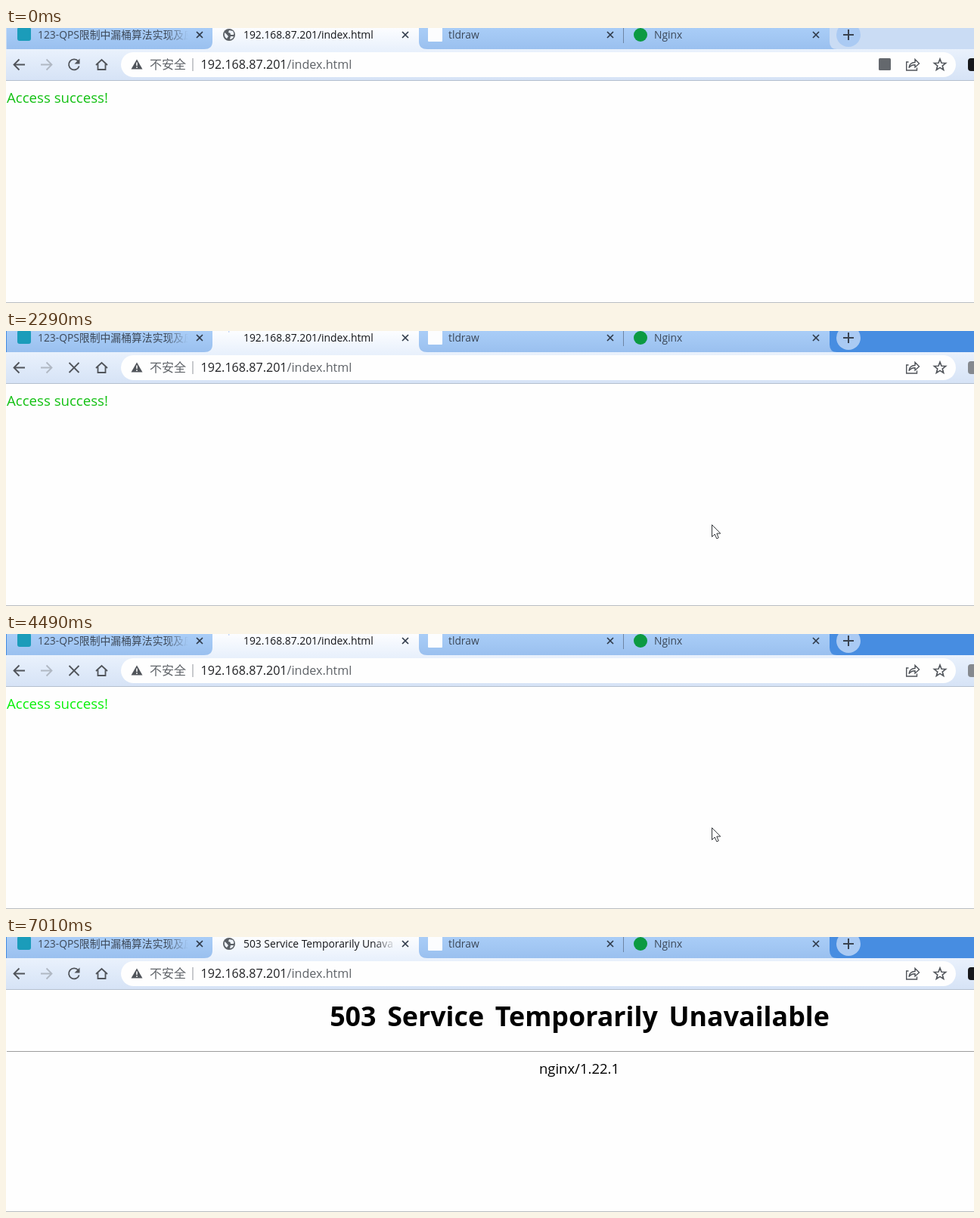
An HTML page for the animation above (8 s loop, 1280 px wide and 364 px high).

```html
<!DOCTYPE html>
<html lang="zh-CN">
<head>
<meta charset="utf-8">
<title>503 demo</title>
<style>
  html, body { margin: 0; width: 100%; height: 100%; overflow: hidden; background: #fefefe; }
  svg { display: block; width: 1280px; height: 364px; }
  text { font-family: "Open Sans", "Noto Sans CJK SC", "Noto Sans CJK", sans-serif; white-space: pre; }
  .tab { font-size: 13.84px; fill: #3c4858; }
  .line { fill: none; stroke: #50545a; stroke-width: 1.8; }
  .thin { stroke-width: 1.4; }
</style>
</head>
<body>
<svg viewBox="0 0 1280 364">
  <defs>
    <linearGradient id="inactive" x2="0" y2="1">
      <stop stop-color="#a9cdf7"/><stop offset="1" stop-color="#9ac0ef"/>
    </linearGradient>
    <linearGradient id="bar" gradientUnits="userSpaceOnUse" x1="0" y1="0" x2="0" y2="69">
      <stop stop-color="#fcfdff"/><stop offset=".42" stop-color="#e9f1fc"/><stop offset="1" stop-color="#d6e3f6"/>
    </linearGradient>
    <linearGradient id="fadeA" gradientUnits="userSpaceOnUse" x1="212" x2="241" y1="0" y2="0">
      <stop stop-color="#3c4858"/><stop offset="1" stop-color="#3c4858" stop-opacity="0"/>
    </linearGradient>
    <linearGradient id="fadeB" gradientUnits="userSpaceOnUse" x1="486" x2="516" y1="0" y2="0">
      <stop stop-color="#141518"/><stop offset="1" stop-color="#141518" stop-opacity="0"/>
    </linearGradient>
    <path id="close" d="M-4-4 4 4M-4 4 4-4" fill="none" stroke="#303b4a" stroke-width="1.7"/>
  </defs>

  <!-- tab strip -->
  <rect id="strip" width="1280" height="28"/>
  <path d="M1 0H1089V18Q1089 28 1099 28H1Z" fill="url(#inactive)"/>
  <path d="M262 28Q273 28 273 18V0H546V18Q546 28 557 28H1280V69H0V28Z" fill="url(#bar)"/>
  <path d="M816.5 0V20" stroke="#6e84a2"/>
  <circle cx="1114" cy="9" r="16" fill="#aacaf3"/>
  <path d="M1107 9H1121M1114 2V16" stroke="#3a4350" stroke-width="2"/>

  <rect x="15" y="-1" width="18" height="18" rx="3" fill="#1b9cba"/>
  <rect x="558" y="-2" width="19" height="20" rx="1" fill="#fcfdfe"/>
  <circle cx="839" cy="9" r="9" fill="#0c9a42"/>

  <text class="tab" x="42" y="14" style="fill:url(#fadeA)">123-QPS限制中漏桶算法实现及应</text>
  <text class="tab" id="title" x="314" y="14"></text>
  <text class="tab" x="585" y="14">tldraw</text>
  <text class="tab" x="857" y="14">Nginx</text>
  <use href="#close" x="256" y="9"/><use href="#close" x="528" y="9"/>
  <use href="#close" x="799" y="9"/><use href="#close" x="1071" y="9"/>

  <g id="globe">
    <circle cx="295" cy="9" r="8" fill="#5b6066"/>
    <path d="M289 6Q292 8 294 11L292 14Q288 12 289 6M295 3L300 4Q302 7 301 9L297 9Q297 6 294 6ZM297 11L301 11Q300 15 296 15Z" fill="#eef3fa"/>
  </g>
  <path id="spinner" fill="none" stroke="#a9c6f4" stroke-width="2"/>

  <!-- toolbar -->
  <rect x="152" y="32" width="1104" height="33" rx="16.5" fill="#fefefe"/>
  <path d="M0 69.5H1280" stroke="#b4bfce"/>
  <path class="line" d="M25 48.5H11M17.5 41.5L10.5 48.5L17.5 55.5"/>
  <path class="line" d="M46 48.5H60M53.5 41.5L60.5 48.5L53.5 55.5" style="stroke:#b0b8c3"/>
  <g id="reload">
    <path class="line" d="M95.5 44A7 7 0 1 0 96.7 50.5"/>
    <path d="M97.5 40.5V47.5H90.5Z" fill="#50545a"/>
  </g>
  <path id="stop" class="line" d="M83.5 42L96.5 55M83.5 55L96.5 42"/>
  <path class="line" d="M119 49L126.5 42L134 49M121.5 47.5V55H131.5V47.5"/>
  <path d="M173 41.5L180.5 54.5H165.5Z" fill="#50545a"/>
  <path d="M173 45.5V50M173 51.3V53" stroke="#fff" stroke-width="1.5"/>
  <text x="190" y="54" font-size="16" fill="#5f6368">不安全</text>
  <path d="M247 40V57" stroke="#a3a7ac" stroke-width="1.2"/>
  <text x="257.5" y="54" font-size="16.1" fill="#5f6368"><tspan fill="#202124">192.168.87.201</tspan>/index.html</text>
  <rect id="translate" x="1154" y="40" width="16" height="16" rx="1.5" fill="#64686d"/>
  <path class="line thin" d="M1193.5 45H1190.7V56H1204.5V52.5M1194 52.5Q1195 45.5 1202 45.5V41.5L1207.5 47L1202 52V48.7Q1197 48.5 1194 52.5Z"/>
  <path class="line" id="star" style="stroke-width:1.6"/>
  <rect id="extension" x="1272" y="40" width="18" height="17" rx="4"/>

  <!-- page -->
  <text id="okPage" x="1" y="99" font-size="18.65">Access success!</text>
  <g id="errorPage" text-anchor="middle">
    <text x="758.5" y="118" font-size="35.8" font-weight="700" word-spacing="5.4">503 Service Temporarily Unavailable</text>
    <path d="M1 151.5H1280" stroke="#9c9c9c"/>
    <text x="758" y="181" font-size="18.5">nginx/1.22.1</text>
  </g>
  <path d="M0 363.5H1280" stroke="#b9bcc0" stroke-width="1.2"/>

  <g id="cursor">
    <circle id="click" cx="3" cy="1" r="14" fill="#fffb80"/>
    <path d="M.5.5V16.4L4.2 13L6.8 18.8L9.3 17.7L6.8 12H11.8Z" fill="#fff" stroke="#33363a"/>
  </g>
</svg>
<script>
const LOOP = 8000;
const el = id => document.getElementById(id);
const show = (id, on) => el(id).setAttribute('display', on ? 'inline' : 'none');
const set = (id, name, value) => el(id).setAttribute(name, value);

// Quick reloads against a limit of one request per second, after a short burst allowance.
const reloads = [
  [1380, 'ok'], [1660, 'ok'], [1940, 'ok'], [2220, 'ok'],
  [2630, 'ok'], [2920, 'error'], [3210, 'error'],
  [3500, 'ok'], [3790, 'error'], [4100, 'error'],
  [4420, 'ok'], [4740, 'error'], [5050, 'error'],
  [5320, 'ok'], [5640, 'error'], [5900, 'error'], [6150, 'error'],
];
const COMMIT = 70, SETTLED = 270;
const LOADED = { ok: 170, error: 115 };

function browserAt(t) {
  let page = 'ok', since = Infinity, loading = false;
  for (const [sent, answer] of reloads) {
    if (t < sent) break;
    since = t - sent;
    loading = since < LOADED[answer];
    if (since >= COMMIT) page = answer;
  }
  const restoring = since >= COMMIT && since < SETTLED;
  return { ok: page === 'ok', loading, restoring, since };
}

// The pointer is sampled in a few discrete positions, as a screen recorder does.
function cursorAt(t) {
  if (t < 130 || t >= 7010) return null;
  const enter = (1 - Math.min(4, Math.floor((t - 130) / 82.5)) / 4) ** 2;
  const leave = (Math.max(0, Math.ceil((t - 6809) / 67)) / 3) ** 1.5;
  return [933 + 146 * enter + 320 * leave, 256 + 65 * enter + 94 * leave];
}

function spinnerPath(ms) {
  const start = -Math.PI / 2 - 0.1 + ms / 900;
  const end = start + 0.1 + ms / 500;
  const point = a => `${295 + 8 * Math.cos(a)} ${9 + 8 * Math.sin(a)}`;
  return `M${point(start)}A8 8 0 0 1 ${point(end)}`;
}

function draw(t) {
  const { ok, loading, restoring, since } = browserAt(t);
  const spinning = loading && since >= 60;
  set('strip', 'fill', t < 860 ? '#cadcf4' : '#478de1');
  show('globe', !loading);
  show('reload', !loading);
  show('stop', loading);
  show('spinner', spinning);
  if (spinning) set('spinner', 'd', spinnerPath(since - 60));
  show('translate', ok && !restoring);
  set('extension', 'fill', restoring ? '#85898e' : '#17181a');

  el('title').textContent = ok ? '192.168.87.201/index.html' : '503 Service Temporarily Unava';
  el('title').style.fill = ok ? '#141518' : 'url(#fadeB)';
  show('okPage', ok);
  set('okPage', 'fill', t < 2630 ? '#12c012' : '#08f008');
  show('errorPage', !ok);

  const tip = cursorAt(t);
  show('cursor', tip);
  if (tip) set('cursor', 'transform', `translate(${tip})`);
  show('click', t >= 860 && t < 990);
}

const starPoints = Array.from({ length: 10 }, (_, i) => {
  const a = i * Math.PI / 5, r = i % 2 ? 3.4 : 8;
  return `${1235 + r * Math.sin(a)} ${49 - r * Math.cos(a)}`;
});
set('star', 'd', `M${starPoints.join('L')}Z`);

const startTime = performance.now();
function tick() {
  draw((performance.now() - startTime) % LOOP);
  requestAnimationFrame(tick);
}
tick();
</script>
</body>
</html>
```
